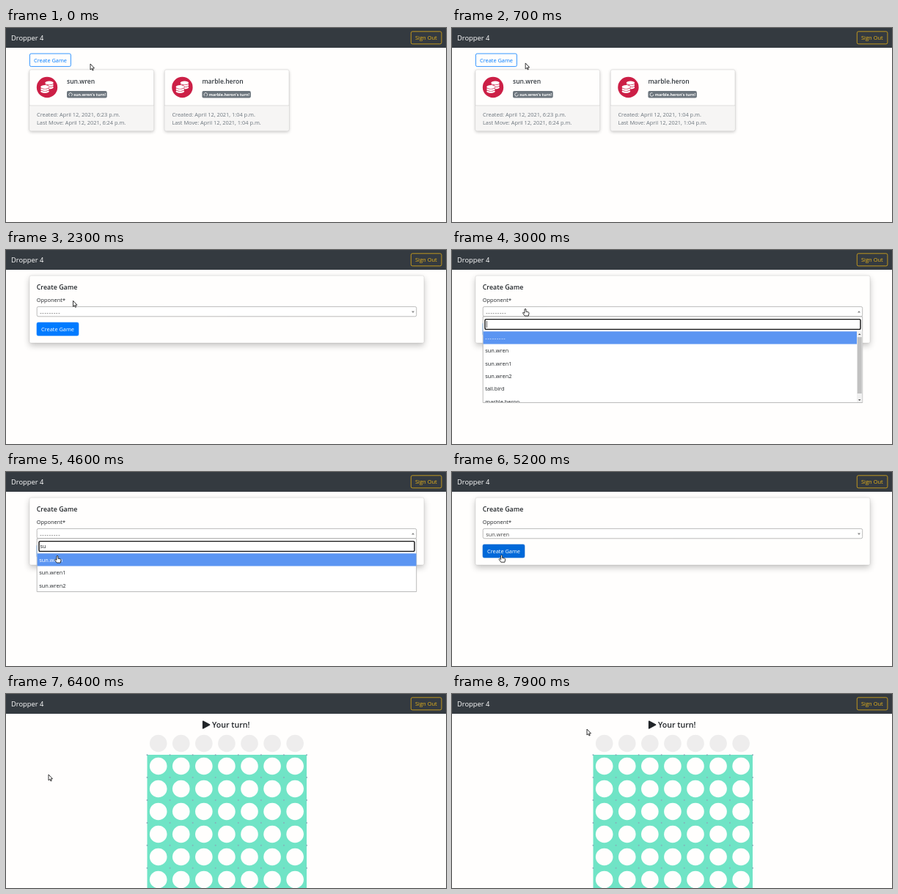
Recreate the animation shown at these times as an HTML page with a canvas. Size 600 px wide and 265 px high, loop 8 s.

```html
<!DOCTYPE html>
<html lang="en">
<head>
<meta charset="utf-8">
<title>Dropper 4</title>
<style>
html, body { margin: 0; height: 100%; overflow: hidden; background: #fffefd; }
canvas { display: block; width: 600px; height: 265px; }
</style>
</head>
<body>
<canvas id="stage" width="600" height="265"></canvas>
<script>
const c = document.getElementById('stage').getContext('2d');
const LOOP = 8000, FORM = 1700, OPEN = 2800, KEY1 = 3500, KEY2 = 3700, PICK = 5000, BOARD = 6400;
const INK = '#212529', PAGE = '#fffefd', BLUE = '#007bff', MUTED = '#6c757d', RED = '#cc1f46';
const DASHES = '---------';
const NAMES = ['sun.wren', 'sun.wren1', 'sun.wren2', 'tall.bird', 'marble.heron'];

// Pointer path: time, x, y
const PATH = [
  [0, 115, 49], [300, 115, 49], [1300, 73, 46], [1800, 73, 46], [2600, 100, 80], [3800, 100, 80],
  [4500, 70, 114], [5000, 70, 114], [5700, 58, 110], [6600, 58, 110], [7700, 184, 48], [LOOP, 184, 48]
];
const ARROW = new Path2D('M0 0V8L1.8 6.4L3 9L4.2 8.5L3 5.9H5.5Z');
const HAND = new Path2D('M-1 1Q0 -.6 1 1V4.2L4 4.8Q5.2 5 5 6.5L4.3 10H-.8L-3.4 6.3Q-3.6 5 -2.2 5.4L-1 6.4Z');

function pointerAt(t) {
  const i = PATH.findIndex(p => p[0] > t);
  const [t0, x0, y0] = PATH[i - 1], [t1, x1, y1] = PATH[i];
  const u = (t - t0) / (t1 - t0), e = u * u * (3 - 2 * u);
  return { x: x0 + (x1 - x0) * e, y: y0 + (y1 - y0) * e };
}

const inside = (p, x, y, w, h) => p.x >= x && p.x <= x + w && p.y >= y && p.y <= y + h;

function text(s, x, y, color = INK, size = 7.4, weight = 400) {
  c.font = `${weight} ${size}px "Open Sans", "Noto Sans", sans-serif`;
  c.letterSpacing = s === DASHES ? '.75px' : '0px';
  c.fillStyle = color;
  c.fillText(s, x, y);
}

function rect(x, y, w, h, fill, stroke, r = 0, line = 1) {
  c.beginPath();
  c.roundRect(x, y, w, h, r);
  if (fill) { c.fillStyle = fill; c.fill(); }
  if (stroke) { c.strokeStyle = stroke; c.lineWidth = line; c.stroke(); }
}

function disc(x, y, r, color, ry = r) {
  c.beginPath();
  c.ellipse(x, y, r, ry, 0, 0, 7);
  c.fillStyle = color;
  c.fill();
}

function triangle(x, y, w, h, color) {
  c.beginPath();
  c.moveTo(x - w, y);
  c.lineTo(x + w, y);
  c.lineTo(x, y + h);
  c.fillStyle = color;
  c.fill();
}

function panel(x, y, w, h, drop, blur) {
  c.save();
  c.shadowColor = 'rgba(0,0,0,.24)';
  c.shadowOffsetY = drop;
  c.shadowBlur = blur;
  rect(x, y, w, h, '#fff', null, 2);
  c.restore();
  rect(x, y, w, h, PAGE, 'rgba(0,0,0,.13)', 2, .7);
}

function coins(x, y) {
  for (let i = 2; i >= 0; i--) {
    disc(x, y + i * 3, 6.3, RED, 3.1);
    disc(x, y + i * 3, 5.7, '#fff', 2.4);
  }
}

function gameCard(x, name, time1, time2, t) {
  panel(x, 57, 169.5, 83.5, 1.5, 4);
  rect(x + .4, 106, 168.7, 34.2, '#f6f5f4', null, [0, 0, 2, 2]);
  rect(x, 105.6, 169.5, .7, 'rgba(0,0,0,.15)');
  disc(x + 24, 81, 14.2, RED);
  coins(x + 27, 75);
  coins(x + 21, 80.5);
  text(name, x + 51, 76.2, '#343a40', 8.55, 600);

  const label = name + "'s turn!";
  c.font = '700 5.4px "Open Sans", "Noto Sans", sans-serif';
  rect(x + 51, 86, 11 + c.measureText(label).width, 9.6, MUTED, null, 2);
  text(label, x + 60.3, 92.8, '#fff', 5.4, 700);
  const a = Math.PI / 2 + t / 1067 * Math.PI * 2;
  c.beginPath();
  c.arc(x + 56, 90.9, 2.3, a + .5, a + 5.8);
  c.strokeStyle = '#fff';
  c.lineWidth = .8;
  c.stroke();

  text(`Created: April 12, 2021, ${time1} p.m.`, x + 10, 120.6, MUTED);
  text(`Last Move: April 12, 2021, ${time2} p.m.`, x + 10, 131.8, MUTED);
}

function listPage(t, p) {
  const hover = inside(p, 32, 34, 57, 19);
  if (t >= 1500) rect(31, 33.6, 58.8, 20.2, '#80bdff', null, 3);
  rect(32.4, 35, 56, 17.6, hover ? BLUE : PAGE, BLUE, 2, .8);
  text('Create Game', 38, 46.8, hover ? '#fff' : BLUE);
  gameCard(32, 'sun.wren', '6:23', '6:24', t);
  gameCard(216.4, 'marble.heron', '1:04', '1:04', t);
  return hover;
}

function dropdown(t) {
  const typed = t < KEY1 ? '' : t < KEY2 ? 's' : 'su';
  const rows = typed ? NAMES.filter(n => n.includes(typed)) : [DASHES, ...NAMES];
  const bottom = typed ? 163.5 : 208.5, right = typed ? 559.5 : 552;
  rect(42.2, 91, 517.5, bottom - 91, '#fff', '#aaa', 0, .8);
  rect(45, 94.6, 512, 13.8, '#fff', '#111', 1.5, 1.4);
  text(typed, 46.5, 104, INK);
  const since = t - (t < KEY1 ? OPEN : t < KEY2 ? KEY1 : KEY2);
  if (since % 1000 < 500) rect(47 + c.measureText(typed).width, 97, .7, 9, INK);

  c.save();
  c.beginPath();
  c.rect(42, 111, 518, bottom - 111.4);
  c.clip();
  rect(42.6, 111.3, right - 42.6, 17.3, '#5b95f2');
  rows.forEach((row, i) => text(row, 45.3, 123 + i * 17.35, i ? INK : '#fff'));
  if (!typed) {
    rect(552, 111, 7.3, 98, '#f1f1f1');
    rect(552.7, 119, 6, 77, '#c1c1c1');
    triangle(555.7, 116, 1.8, -2, '#555');
    triangle(555.7, 204, 1.8, 2, '#555');
  }
  c.restore();
}

function formPage(t, p) {
  const open = t >= OPEN && t < PICK;
  const hover = !open && inside(p, 42, 99, 57, 18);
  panel(32, 35, 538, 92, 3.5, 8);
  text('Create Game', 41.7, 54, INK, 8.9, 600);
  text('Opponent*', 41.8, 70.6);
  rect(42.2, 77.4, 517.5, 13.4, '#fff', '#aaa', 2, .8);
  text(t < PICK ? DASHES : NAMES[0], 46.2, 87.5, '#444');
  triangle(555, open ? 85.5 : 83.5, 2, open ? -2.4 : 2.4, '#888');
  rect(42, 99, 57, 18, hover ? '#0069d9' : BLUE, hover ? '#0062cc' : BLUE, 2, .6);
  text('Create Game', 48, 111, '#fff');
  if (open) dropdown(t);
  return hover || inside(p, 42, 77, 518, 14) || open && p.y >= 111;
}

function boardPage() {
  const step = 31.07, left = 192.5;
  c.beginPath();
  c.moveTo(268.7, 37.2);
  c.lineTo(277.5, 42);
  c.lineTo(268.7, 46.8);
  c.closePath();
  c.lineJoin = 'round';
  c.lineWidth = 1.6;
  c.fillStyle = c.strokeStyle = INK;
  c.fill();
  c.stroke();
  text('Your turn!', 281, 46, INK, 10.6, 600);
  rect(left, 83, 7 * step, 182, '#70e4c6');
  for (let row = 0; row < 7; row++) {
    for (let col = 0; col < 7; col++) {
      disc(left + 15.2 + col * step, 67.5 + row * 31, 11.8, row ? PAGE : '#eeeded');
    }
  }
  for (let row = 0; row < 6; row++) {
    for (let col = 0; col < 8; col++) disc(left + col * step, 83.2 + row * 30.9, 1, '#86aeb9');
  }
}

function header() {
  rect(0, 0, 600, 27, '#343a40');
  text('Dropper 4', 7, 16.7, '#fff', 9.35);
  rect(552.3, 4.8, 41.6, 17, null, '#e0ad17', 2, .8);
  text('Sign Out', 558, 16.3, '#e8b41a', 7.5);
}

function pointer(p, hand) {
  const shape = hand ? HAND : ARROW;
  c.save();
  c.translate(p.x, p.y);
  c.fillStyle = '#fff';
  c.strokeStyle = '#222';
  c.lineWidth = .9;
  c.fill(shape);
  c.stroke(shape);
  c.restore();
}

function draw(now) {
  const t = now % LOOP, p = pointerAt(t);
  rect(0, 0, 600, 265, PAGE);
  header();
  const hand = t < FORM ? listPage(t, p) : t < BOARD ? formPage(t, p) : boardPage();
  pointer(p, hand);
}

const start = performance.now();
function tick() {
  draw(performance.now() - start);
  requestAnimationFrame(tick);
}
tick();
</script>
</body>
</html>
```
